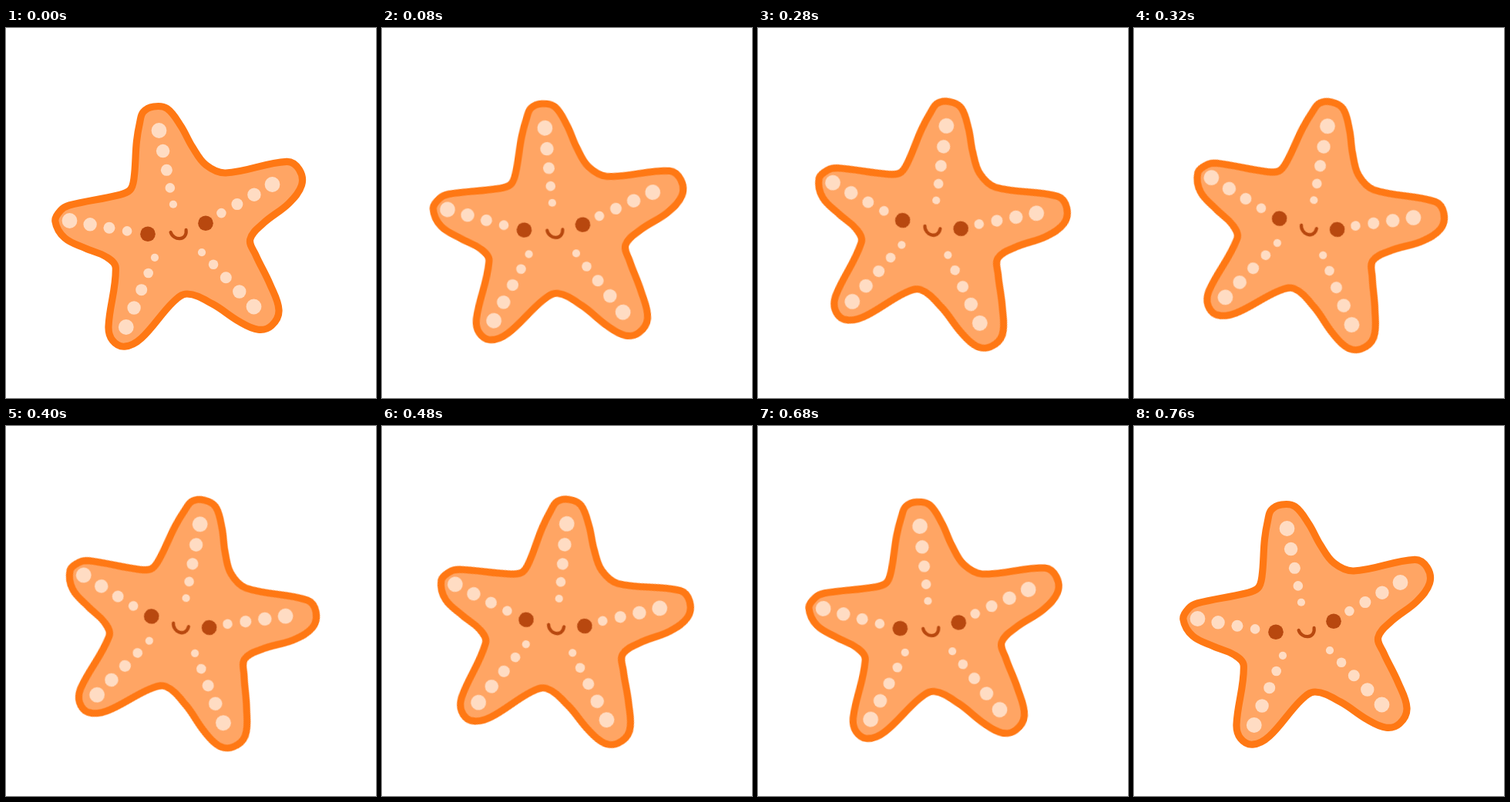
An HTML page that plays this animation: 480 by 480 pixels, repeating every 0.8 s.

```html
<!DOCTYPE html>
<html lang="en">
<head>
<meta charset="utf-8">
<title>Starfish</title>
<style>
  html, body { margin: 0; width: 100%; height: 100%; overflow: hidden; background: #fff; }
  svg { display: block; width: 100%; height: 100%; }
  #star { transform-origin: 239.6px 269.6px; }
  #body { fill: #ffa564; stroke: #ff7814; stroke-width: 9.2; stroke-linejoin: round; }
  #dots { fill: #ffdcc3; }
  .eyes { fill: #b8480f; }
  .mouth { fill: none; stroke: #b8480f; stroke-width: 4.2; stroke-linecap: round; }
</style>
</head>
<body>
<svg viewBox="0 0 480 480">
  <g id="star">
    <path id="body"/>
    <g id="dots"></g>
    <g class="eyes">
      <circle cx="184" cy="267.3" r="9.8"/>
      <circle cx="259" cy="253.3" r="9.8"/>
    </g>
    <path class="mouth" d="M213.6 264.9C217 276.3 235.5 276.3 233.6 261.9"/>
  </g>
</svg>
<script>
  const byId = id => document.getElementById(id);

  // Closed curve through key points; each tangent runs parallel to its neighbours' chord.
  function smoothPath(points) {
    const at = i => points[(i + points.length) % points.length];
    const handle = (i, length) => {
      const [x, y] = at(i), [px, py] = at(i - 1), [nx, ny] = at(i + 1);
      const k = length / Math.hypot(nx - px, ny - py);
      return [x + (nx - px) * k, y + (ny - py) * k];
    };
    const curves = points.map(([x, y], i) => {
      const [nx, ny] = at(i + 1);
      const reach = 0.35 * Math.hypot(nx - x, ny - y);
      return `C${handle(i, reach)} ${handle(i + 1, -reach)} ${[nx, ny]}`;
    });
    return `M${points[0]}${curves.join('')}Z`;
  }

  // Clockwise from the top arm: side, valley, side and cap of each arm.
  byId('body').setAttribute('d', smoothPath([
    [209, 104.5], [226.8, 127], [241.8, 154.3], [259.3, 177.7], [285, 188],
    [364, 173.3], [380.3, 183.5], [383.5, 204], [366.9, 227.4], [334.3, 252.9], [316.8, 274],
    [324, 294.6], [342.4, 332.3], [354, 366], [344.6, 386], [327, 391.2], [302.9, 381],
    [267.8, 357.9], [235, 345], [216.6, 355.7], [175.7, 402.4], [154, 413.2], [138.3, 405.4],
    [133, 387], [142.3, 311], [130.2, 297], [103.2, 285.9], [76.2, 272.4], [63.9, 251],
    [70.5, 237.1], [82, 230], [145, 217], [160.8, 210.3], [166, 195],
    [169.4, 147.5], [173.7, 122], [178, 109], [191.5, 102]
  ]));

  // A row of dots from an arm's tip inwards, shrinking and closing up.
  function dotRow(x, y, degrees, count) {
    const angle = degrees * Math.PI / 180;
    for (let i = 0; i < count; i++) {
      const along = 27.9 * i - 0.88 * i * i;
      const dot = document.createElementNS('http://www.w3.org/2000/svg', 'circle');
      dot.setAttribute('cx', x + along * Math.cos(angle));
      dot.setAttribute('cy', y + along * Math.sin(angle));
      dot.setAttribute('r', 9.9 - 1.2 * i);
      byId('dots').append(dot);
    }
  }
  dotRow(198.5, 133, 79.1, 5);
  dotRow(345.5, 203, 150.7, 4);
  dotRow(321.5, 361.5, 226.2, 5);
  dotRow(155.8, 388, 292.4, 5);
  dotRow(82.5, 250, 10.2, 4);

  // Swing out in nine 40 ms steps, back in ten, then rest for one.
  byId('star').animate([
    { transform: 'rotate(0deg)', offset: 0, easing: 'steps(9)' },
    { transform: 'rotate(24deg)', offset: 0.45, easing: 'steps(10)' },
    { transform: 'rotate(0deg)', offset: 0.95 },
    { transform: 'rotate(0deg)', offset: 1 }
  ], { duration: 800, iterations: Infinity });
</script>
</body>
</html>
```
